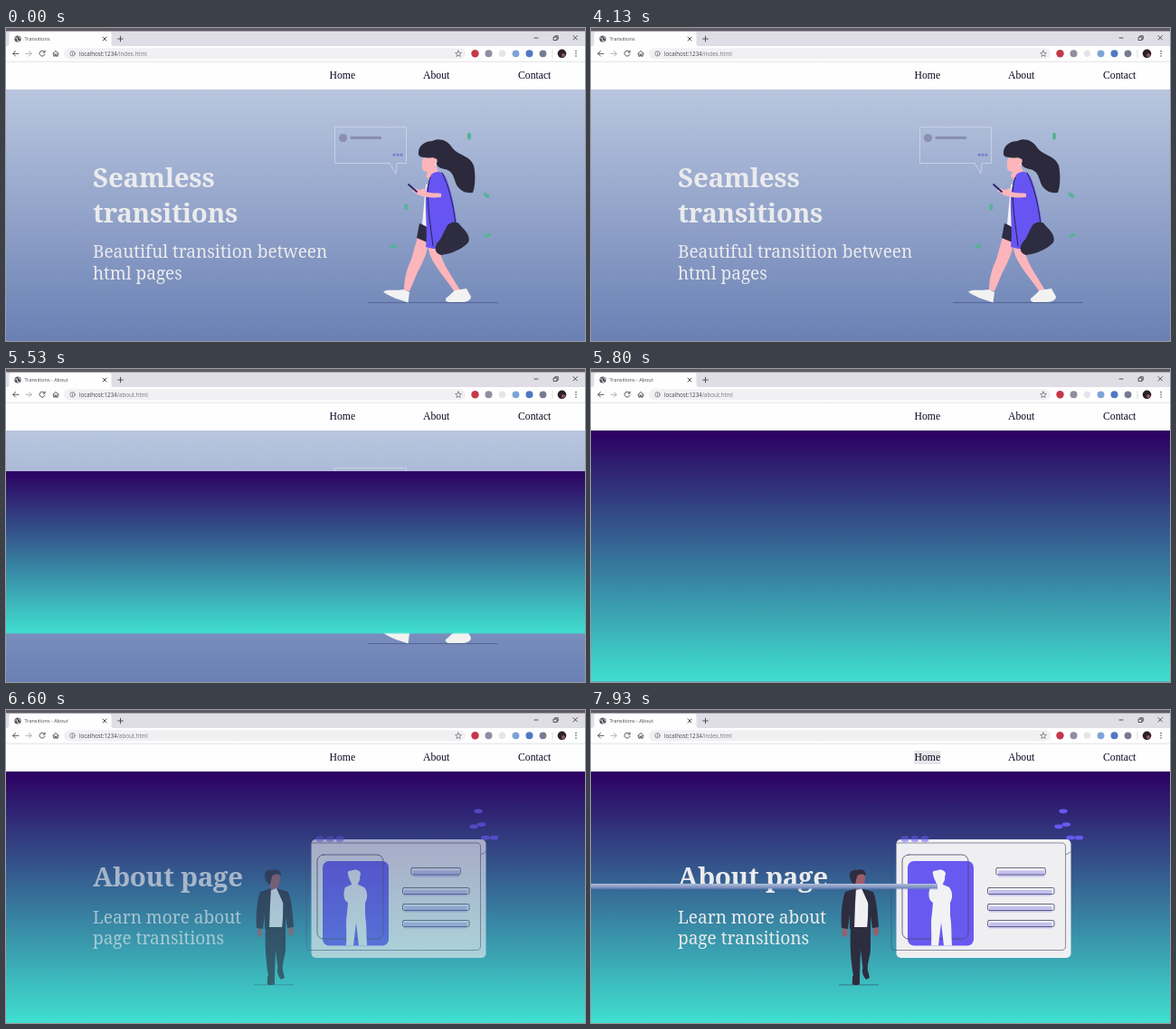
These frames come from a looping animation (640x346 px, 8 s). An HTML page:

```html
<!DOCTYPE html>
<html lang="en">
<head>
<meta charset="utf-8">
<title>Page transitions</title>
<style>
  html, body { margin: 0; width: 100%; height: 100%; overflow: hidden; background: #fff; }
  svg { display: block; width: 100%; height: 100%; }
  .ui { font: 5.5px "Open Sans", sans-serif; fill: #45454e; }
  .url { font-size: 6.2px; }
  .nav { font: 11.7px "Liberation Serif", serif; fill: #0b0820; }
  .title { font: 700 29.5px "Noto Serif", serif; letter-spacing: -.3px; fill: #ebebed; }
  .lead { font: 500 19px "Noto Serif", serif; fill: #ebebed; }
  .line { fill: none; stroke-linecap: round; stroke-linejoin: round; }

  /* Every animation shares one 8 s clock. */
  .anim { animation: 8s linear infinite both; }
  .sheet { animation-name: sheet; }
  .about { animation-name: reveal; }
  .return { animation-name: return; }
  .cursor { animation-name: cursor; }
  .title-home, .title-about, .url-home, .url-about, .focus { animation-timing-function: step-end; }
  .title-home { animation-name: title-home; }
  .title-about { animation-name: title-about; }
  .url-home { animation-name: url-home; }
  .url-about { animation-name: url-about; }
  .focus { animation-name: focus; }

  /* cubic-bezier(.3333, .6667, .6667, 1) is an exact quadratic ease-out. */
  @keyframes sheet {
    0% { transform: translate(-640px, 191.5px) scale(1, .0222); visibility: hidden; }
    60.4% { transform: translate(-640px, 191.5px) scale(1, .0222); visibility: hidden; animation-timing-function: cubic-bezier(.3333, .6667, .6667, 1); }
    66.65% { transform: translate(0, 191.5px) scale(1, .0222); visibility: visible; animation-timing-function: cubic-bezier(.3333, .6667, .6667, 1); }
    72.9%, 100% { transform: translate(0, 67.9px) scale(1, 1); visibility: visible; }
  }
  @keyframes reveal {
    0% { opacity: 0; }
    72.9% { opacity: 0; animation-timing-function: cubic-bezier(.3333, .6667, .6667, 1); }
    97.9%, 100% { opacity: 1; }
  }
  /* The loop cuts this slide about halfway through its ease-out. */
  @keyframes return {
    0% { transform: translate(-640px, 191.5px); }
    96.85% { transform: translate(-640px, 191.5px); animation-timing-function: cubic-bezier(.3333, .4456, .6667, .779); }
    100% { transform: translate(-157px, 191.5px); }
  }
  @keyframes cursor {
    0%, 29.95% { transform: translate(439px, -12px); }
    31%, 32.5% { transform: translate(439px, 3px); }
    34.5%, 100% { transform: translate(441px, -12px); }
  }
  @keyframes title-home { 0% { opacity: 1; } 64%, 100% { opacity: 0; } }
  @keyframes title-about { 0% { opacity: 0; } 64%, 100% { opacity: 1; } }
  @keyframes url-home { 0% { opacity: 1; } 61.6% { opacity: 0; } 95.8%, 100% { opacity: 1; } }
  @keyframes url-about { 0% { opacity: 0; } 61.6% { opacity: 1; } 95.8%, 100% { opacity: 0; } }
  @keyframes focus { 0% { opacity: 0; } 95.8%, 100% { opacity: 1; } }
</style>
</head>
<body>
<svg viewBox="0 0 640 346" preserveAspectRatio="none">
  <defs>
    <linearGradient id="sky" x2="0" y2="1">
      <stop stop-color="#b9c6df"/><stop offset="1" stop-color="#6a80b4"/>
    </linearGradient>
    <linearGradient id="sea" x2="0" y2="1">
      <stop stop-color="#2d0062"/><stop offset="1" stop-color="#40e0d0"/>
    </linearGradient>
    <g id="row">
      <rect x="440" y="3" width="69.5" height="6.5" rx="1" fill="#c4c0ef"/>
      <rect x="438.5" y=".5" width="73.5" height="7" rx="1.5" class="line" stroke="#4a4868" stroke-width=".8"/>
    </g>
  </defs>

  <!-- Home page -->
  <rect y="67.9" width="640" height="278.1" fill="url(#sky)"/>
  <g class="title"><text x="96" y="176">Seamless</text><text x="96" y="214.5">transitions</text></g>
  <g class="lead"><text x="96" y="254">Beautiful transition between</text><text x="96" y="277.5">html pages</text></g>

  <g id="bubble">
    <path class="line" d="M424 149.5H363.5V109.5H442.5V149.5H432L431 161L424 149.5" stroke="#d0d7e6" stroke-width=".8"/>
    <circle cx="372.5" cy="121.5" r="4.6" fill="#8b8fb0"/>
    <rect x="380.5" y="119.8" width="34.5" height="3.3" rx="1" fill="#8b8fb0"/>
    <g fill="#7c82cc"><circle cx="429" cy="140.2" r="1.6"/><circle cx="433" cy="140.2" r="1.6"/><circle cx="437" cy="140.2" r="1.6"/></g>
  </g>
  <g fill="#57b299">
    <ellipse cx="512" cy="119.5" rx="2.1" ry="4"/>
    <ellipse cx="531" cy="185" rx="2" ry="4" transform="rotate(-55 531 185)"/>
    <ellipse cx="442.3" cy="198" rx="2.1" ry="3.6"/>
    <ellipse cx="532" cy="229.3" rx="2" ry="4" transform="rotate(65 532 229.3)"/>
    <ellipse cx="428" cy="241.5" rx="2" ry="4" transform="rotate(75 428 241.5)"/>
  </g>
  <path class="line" d="M400.5 303.6H543.5" stroke="#4f6190" stroke-width=".9"/>

  <g id="walker">
    <g fill="#fcb5bb">
      <path d="M455 231L467 236C466 250 459 262 454 272L446 291L440 290C440 278 443 266 448 256Z"/>
      <path d="M466 238L479 243C480 252 484 260 488 267L502 290L496 292C490 282 479 270 474 261C469 254 467 246 466 238Z"/>
      <path d="M460 146C462 142 471 141 475 144L475.5 153L478 160L468 168L464 164L466 159C461 159 459 156 460 150Z"/>
    </g>
    <path d="M439 289L446 292L444.5 303.5C437 301 423 297 417 291.5C422 288 432 291 439 289Z" fill="#f2f2f3"/>
    <path d="M496 290L509 288L514 297C514 301 509 303 504 303H489C485 302 485 299 488 297.5Z" fill="#f2f2f3"/>
    <path d="M457 216L472 221L468 238L454 232Z" fill="#2e2c42"/>
    <path d="M464 173L470 172L469 222L460 217Z" fill="#f1f0f4"/>
    <path d="M470 162C475 158 481 158 485 163C490 172 495 192 498 214L490 222L483 243C477 245 470 244 464 242C467 222 461 190 466 174Z" fill="#6655f3"/>
    <path class="line" d="M469 165C463 180 468 208 472 241M482 160C489 174 494 192 497 217" stroke="#25234a" stroke-width="1"/>
    <path d="M470 174L482 174L483 183L478 185L466 182Z" fill="#6655f3"/>
    <path d="M449 180L451 177L458 179L462 177L464 181C470 183 476 182 481 183V187C470 188 461 187 455 184Z" fill="#fcb5bb"/>
    <path class="line" d="M445 173L454 181" stroke="#272568" stroke-width="1.8"/>
    <path d="M488 218C492 214 499 213 502 218C507 223 514 230 511 237C505 244 492 250 481 251C474 249 473 243 477 237C482 233 484 224 488 218Z" fill="#2e2c40"/>
    <path d="M456 139C455 130 464 125 471 125C479 121 488 124 493 132C499 141 512 140 517 152C519 161 519 174 516 182C507 183 500 179 497 171C494 162 493 158 485 156C478 155 475 152 475 145C472 141 468 145 463 143C459 143 456 142 456 139Z" fill="#2b293b"/>
    <ellipse cx="475" cy="147" rx="1.7" ry="2.8" fill="#fcb5bb"/><circle cx="475" cy="150.5" r=".9" fill="#f0eef6"/>
  </g>

  <!-- About page -->
  <rect class="anim sheet" width="640" height="278.1" fill="url(#sea)"/>
  <g class="anim about">
    <text class="title" x="96" y="195">About page</text>
    <g class="lead"><text x="96" y="235.5">Learn more about</text><text x="96" y="259">page transitions</text></g>

    <g fill="#6859f1">
      <ellipse cx="522" cy="111.8" rx="4.7" ry="2.4"/><ellipse cx="517" cy="128.8" rx="4.7" ry="2.4"/>
      <ellipse cx="525.5" cy="126.6" rx="4.7" ry="2.4"/><ellipse cx="530" cy="141.2" rx="4.7" ry="2.4"/>
      <ellipse cx="539.5" cy="141.2" rx="4.7" ry="2.4"/>
    </g>
    <rect x="337.5" y="143" width="193" height="131" rx="5" fill="#efeff2"/>
    <g fill="#6859f1" opacity=".55"><ellipse cx="347" cy="142.5" rx="4.5" ry="3.5"/><ellipse cx="358" cy="142.5" rx="4.5" ry="3.5"/><ellipse cx="369" cy="142.5" rx="4.5" ry="3.5"/></g>
    <path class="line" d="M338 147H520Q524.5 147 524.5 151V261Q524.5 265.5 520 265.5H336Q332 265.5 332 261V153M525 160L530 157" stroke="#4a4868" stroke-width=".6"/>
    <rect x="350" y="167" width="73" height="93.5" rx="7" fill="#6859f1"/>
    <rect x="344" y="160" width="73" height="93" rx="7" class="line" stroke="#4a4868" stroke-width=".8"/>
    <path d="M378 181C376 177 383 178 385 176.5C390 176 394 180 391 184C392 189 389 190 389 193L396 196C400 201 400 208 397 213L397 227C399 238 398 249 399 260.5H390L387 235L384 260.5H376C377 247 375 236 377 224L378 213C372 210 373 201 375 196L382 193C382 190 379 188 378 181Z" fill="#f2f2f5"/>
    <rect x="450" y="177.5" width="51" height="7" rx="1" fill="#c4c0ef"/>
    <rect x="447.8" y="174.5" width="54.5" height="7.5" rx="1.5" class="line" stroke="#4a4868" stroke-width=".8"/>
    <use href="#row" y="196"/><use href="#row" y="214"/><use href="#row" y="232"/>

    <g id="man">
      <path class="line" d="M274.5 303.8H317.5" stroke="#315d77" stroke-width=".7"/>
      <g fill="#9c5e68">
        <path d="M291 186C291 180 302 178 303 185C303 191 301 195 299 197V203H292V194Z"/>
        <ellipse cx="280.5" cy="246" rx="2.7" ry="5"/><ellipse cx="315" cy="244.5" rx="2.8" ry="5"/>
        <path d="M291 290H296V296H291Z"/>
      </g>
      <path d="M291 200L299 197L306 202V242H290Z" fill="#f0f0f3"/>
      <g fill="#2e2d40">
        <path d="M287 240H309L309 265C308 275 305 280 306 290H301L298 265L297 294H290C287 278 286 258 287 240Z"/>
        <path d="M289 294L297 293V302Q297 304 293 304H290Q288 303 289 299Z"/>
        <path d="M301 286L306 288L308 296L304 298Q299 292 300 286Z"/>
        <path d="M293 197L281 201C277 211 276 230 277 241L284 242L286 226V242H291L292 214Z"/>
        <path d="M299 197L312 201C316 211 317 227 318 240L311 241L309 228V243H305L307 215Z"/>
        <path d="M286 184C285 178 290 176 294 177C299 175 304 177 304 183C300 181 296 181 294 184L292 193C288 192 287 188 286 184Z"/>
      </g>
    </g>
  </g>

  <rect class="anim return" width="640" height="6.2" fill="url(#sky)"/>

  <!-- Page header -->
  <rect y="37" width="640" height="31" fill="#fefefe"/>
  <rect class="anim focus" x="357" y="45" width="29.5" height="15" fill="#e6e6ea"/>
  <g class="nav"><text x="357.5" y="56.2">Home</text><text x="461" y="56.2">About</text><text x="566" y="56.2">Contact</text></g>

  <!-- Browser frame -->
  <rect width="640" height="21" fill="#dfdee7"/>
  <rect width="640" height="3.5" fill="#5f5963"/>
  <path d="M0 20H1Q3.5 20 3.5 17V7Q3.5 4 6.5 4H113.5Q116.5 4 116.5 7V17Q116.5 20 119 20H640V37H0Z" fill="#fefefe"/>
  <path d="M0 37.2H640" stroke="#d9d9df" stroke-width=".7"/>
  <circle cx="13" cy="12" r="3.6" fill="#4e5058"/>
  <path class="line" d="M10.5 11Q13 10 12.5 12.5T14.5 14.5M14 9.5L15.5 11.5" stroke="#e6e6ea" stroke-width="1"/>
  <g class="ui">
    <text class="anim title-home" x="20.5" y="14">Transitions</text>
    <text class="anim title-about" x="20.5" y="14">Transitions - About</text>
  </g>
  <g class="line" stroke="#45454c" stroke-width=".9">
    <path d="M107 10L111 14M111 10L107 14M123.7 12H129.3M126.5 9.2V14.8"/>
    <path d="M584 11H588M605.5 10H609V13.5H605.5ZM606.8 9.8V8.7H610.3V12.2H609M627 8.5L631.5 13M631.5 8.5L627 13"/>
    <path d="M14 28.3H7.8M10.5 25.5L7.7 28.3L10.5 31.1M42.6 26.4A3 3 0 1 0 43 29M43 25V27H41"/>
    <path d="M51.8 28.5L55 25.4L58.2 28.5M52.8 28V31.2H54.3V29H55.7V31.2H57.2V28"/>
    <path d="M22 28.3H28M25.4 25.5L28.2 28.3L25.4 31.1" stroke="#a6a6ac"/>
  </g>
  <rect x="64" y="22.2" width="444" height="12.2" rx="6.1" fill="#f1f1f4"/>
  <g class="line" stroke="#65656c" stroke-width=".7">
    <circle cx="73.5" cy="28.3" r="2.7"/><path d="M73.5 28V29.7M73.5 26.8V26.9"/>
    <path d="M500 25L501 27.3L503.4 27.5L501.5 29.1L502.1 31.5L500 30.2L497.9 31.5L498.5 29.1L496.6 27.5L499 27.3Z"/>
  </g>
  <g class="ui url">
    <text class="anim url-home" x="81" y="30.5">localhost:1234<tspan fill="#77777e">/index.html</tspan></text>
    <text class="anim url-about" x="81" y="30.5">localhost:1234<tspan fill="#77777e">/about.html</tspan></text>
  </g>
  <circle cx="518.5" cy="28.3" r="4.2" fill="#c5384a"/>
  <circle cx="533.5" cy="28.3" r="4" fill="#8e8fa0"/>
  <circle cx="548.5" cy="28.3" r="3.8" fill="#e4e5e8"/>
  <circle cx="563.5" cy="28.3" r="3.9" fill="#7da3d6"/>
  <circle cx="578.5" cy="28.3" r="4" fill="#4f78c4"/>
  <circle cx="593.5" cy="28.3" r="3.9" fill="#777b91"/>
  <path d="M604 24V33" stroke="#d0d0d6" stroke-width=".7"/>
  <circle cx="614.5" cy="28.3" r="4.8" fill="#2d2027"/><circle cx="616" cy="30" r="2" fill="#8f5566"/>
  <g fill="#55555c"><circle cx="630" cy="25.6" r=".8"/><circle cx="630" cy="28.3" r=".8"/><circle cx="630" cy="31" r=".8"/></g>

  <path class="anim cursor" d="M0 0V8L1.8 6.4L3 9.2L4.3 8.6L3.1 5.9H5.6Z" fill="#fff" stroke="#222" stroke-width=".6"/>
</svg>
</body>
</html>
```
